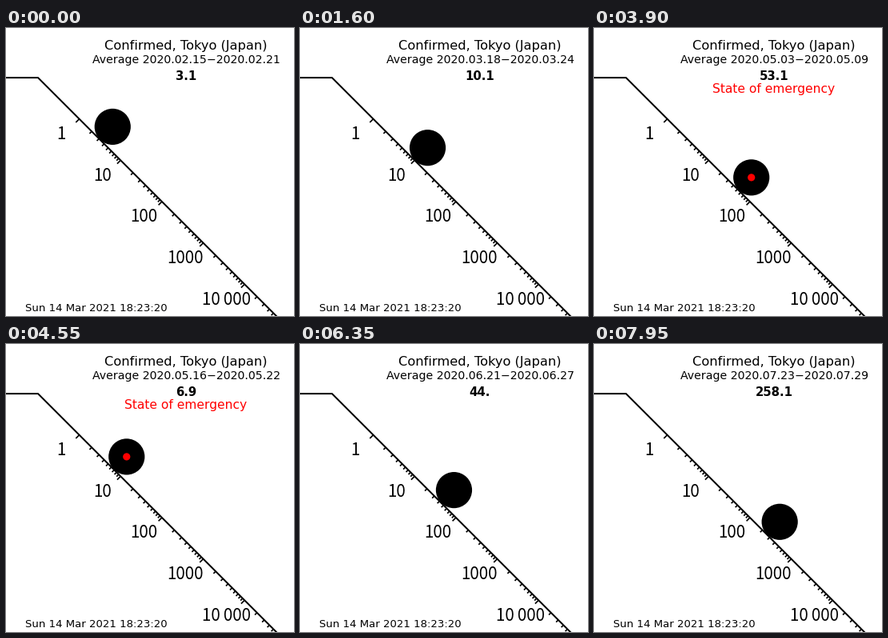
Animation, 360 px wide and 360 px high, one loop 8000 ms. Source, as a matplotlib script:

```python
import numpy as np
import matplotlib.pyplot as plt
from matplotlib.animation import FuncAnimation
from matplotlib.patches import Circle

SIZE, DPI = 360, 100
DAYS, STEP_MS = 160, 50
DECADE = 51.65                 # pixels per factor of ten, along x and y
ONE = np.array([91.6, 113.7])  # where the value 1 sits on the slope
RADIUS = 22.6
DOWN_LEFT = np.array([-1, 1])
EMERGENCY = range(46, 95)

# Turning points of the seven-day total: (day, cases).
TURNS = [
    (0, 22), (2, 10), (10, 7), (18, 30), (24, 26), (32, 71), (34, 143),
    (46, 673), (50, 1018), (57, 1103), (63, 950), (70, 584), (75, 645),
    (78, 372), (85, 128), (92, 41), (104, 127), (112, 130), (119, 238),
    (127, 308), (136, 696), (146, 1368), (159, 1807),
]
turn_days, turn_totals = zip(*TURNS)
logs = np.interp(range(DAYS), turn_days, np.log(turn_totals))
averages = np.round(np.exp(logs)) / 7


def px(size):
    return size * 72 / DPI


def date(day):
    day += 14
    for month, length in enumerate((29, 31, 30, 31, 30, 31), 2):
        if day < length:
            return f"2020.{month:02d}.{day + 1:02d}"
        day -= length


def on_slope(value):
    return ONE + DECADE * np.log10(value)


fig = plt.figure(figsize=(SIZE / DPI, SIZE / DPI), dpi=DPI, facecolor="white")
ax = fig.add_axes([0, 0, 1, 1])
ax.set_xlim(0, SIZE)
ax.set_ylim(SIZE, 0)
ax.axis("off")


def stroke(points, width):
    ax.plot(*np.transpose(points), color="black", lw=px(width),
            solid_capstyle="butt", solid_joinstyle="miter")


def label(x, y, text, size, **style):
    style = {"ha": "center", "family": "DejaVu Sans"} | style
    return ax.text(x, y, text, fontsize=px(size), va="baseline", **style)


stroke([(-5, 62.1), (40, 62.1), (345, 367.1)], 2)
for power in range(5):
    for digit in range(1, 10):
        start = on_slope(digit * 10 ** power)
        length = 4.3 if digit == 1 else 2.7
        stroke([start, start + length * DOWN_LEFT], 1.7)
    name = str(10 ** power).replace("10000", "10\u2009000")
    x, y = on_slope(10 ** power) + (-22.4, 25.5)
    label(x, y, name, 20.5, family=["Noto Sans CJK JP", "DejaVu Sans"])

label(225, 27, "Confirmed, Tokyo (Japan)", 16.2)
label(23.5, 354, "Sun 14 Mar 2021 18:23:20", 13.2, ha="left")
period = label(225.3, 44, "", 14.1)
value = label(225, 65, "", 14.9, weight="bold")
alert = label(224.5, 81, "State of emergency", 15.5, color="red")
ball = ax.add_patch(Circle((0, 0), RADIUS, fc="black", lw=0))
dot = ax.add_patch(Circle((0, 0), 4.6, fc="red", lw=0, zorder=5))


def draw(day):
    average = averages[day]
    center = on_slope(average) - DOWN_LEFT * RADIUS / np.sqrt(2)
    ball.center = dot.center = center
    period.set_text(f"Average {date(day)}\u2212{date(day + 6)}")
    value.set_text(f"{average:.1f}".removesuffix("0"))
    for item in (alert, dot):
        item.set_visible(day in EMERGENCY)
    return ball, dot, period, value, alert


anim = FuncAnimation(fig, draw, frames=DAYS, interval=STEP_MS, repeat=True,
                     repeat_delay=0, blit=False)
plt.show()
```
